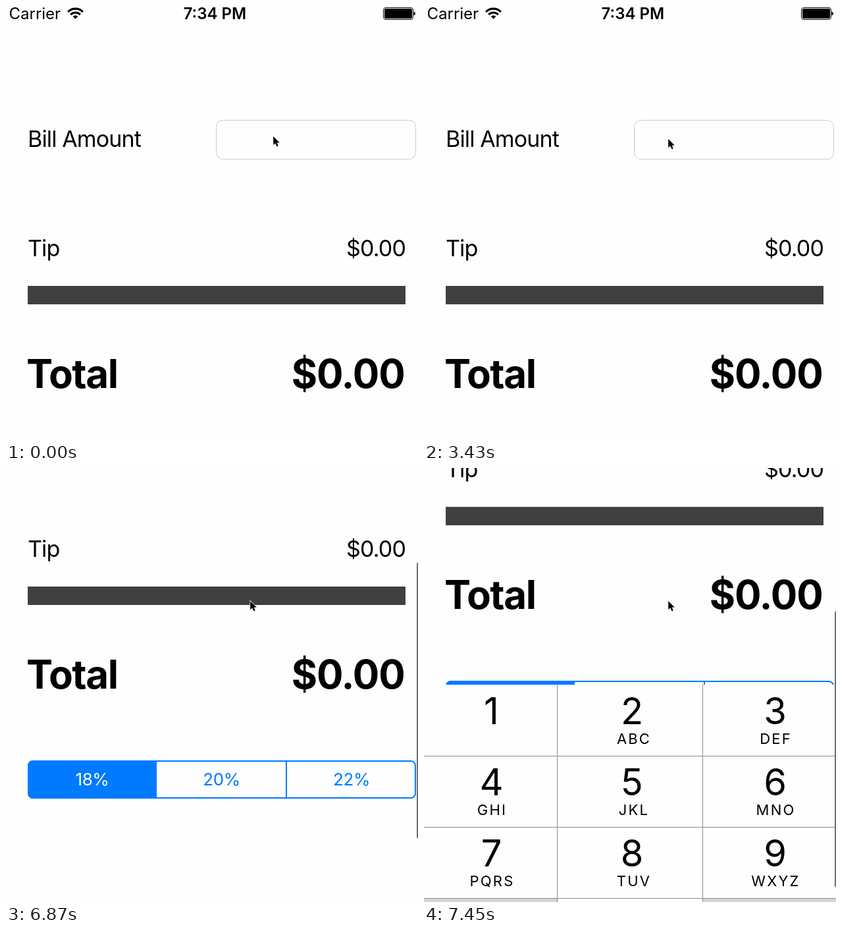
Animation, 626 px wide and 659 px high, one loop 8000 ms. Source, as an HTML page:

```html
<!DOCTYPE html>
<html lang="en">
<head>
<meta charset="utf-8">
<title>Tip calculator</title>
<style>
  html, body { margin: 0; width: 100%; height: 100%; overflow: hidden; background: #fefefe; }
  svg { display: block; width: 626px; height: 659px; font-family: Inter, sans-serif; }
  .label { font-size: 34px; letter-spacing: -.85px; }
  .total { font-size: 60px; font-weight: 700; letter-spacing: -1.4px; }
  .total.end { letter-spacing: -1.1px; }
  .status { font-size: 24px; }
  .seg { font-size: 26px; letter-spacing: -.4px; text-anchor: middle; fill: #007aff; }
  .digit { font-size: 56px; text-anchor: middle; }
  .letters { font-size: 22px; letter-spacing: 2.2px; text-anchor: middle; }
  .end { text-anchor: end; }
</style>
</head>
<body>
<svg viewBox="0 0 626 659">
  <rect width="626" height="659" fill="#fefefe"/>
  <g id="page">
    <text class="status" x="4.5" y="20">Carrier</text>
    <g fill="none" stroke="#000" stroke-width="3.2">
      <path d="M94.2 8.8a16 16 0 0 1 22.6 0"/>
      <path d="M98.2 13a10.4 10.4 0 0 1 14.6 0"/>
    </g>
    <path d="M105.5 19.8l-3.9-4a5.6 5.6 0 0 1 7.8 0z"/>
    <text class="status" x="317.3" y="20" font-weight="600" text-anchor="middle">7:34 PM</text>
    <rect x="573.5" y="2.5" width="45" height="18" rx="3.5" fill="none" stroke="#000"/>
    <rect x="575" y="4" width="42" height="15" rx="2"/>
    <path d="M619.5 8.5q2.5 .6 2.5 3t-2.5 3z"/>

    <text class="label" x="33" y="214">Bill Amount</text>
    <rect x="319.5" y="173.5" width="303" height="59" rx="10" fill="#fefefe" stroke="#ccc"/>
    <rect id="caret" x="605" y="183" width="4" height="36" rx="1" fill="#426bf2"/>

    <text class="label" x="33" y="380">Tip</text>
    <text class="label end" x="607" y="380">$0.00</text>
    <rect x="33" y="425" width="574" height="28" fill="#404040"/>
    <text class="total" x="31" y="580">Total</text>
    <text class="total end" x="605.5" y="580">$0.00</text>

    <rect x="34" y="690" width="588" height="56" rx="7" fill="none" stroke="#007aff" stroke-width="2"/>
    <path d="M229 689H41a8 8 0 0 0-8 8v42a8 8 0 0 0 8 8h188z" fill="#007aff"/>
    <path d="M426 690v56" stroke="#007aff" stroke-width="2"/>
    <text class="seg" x="131" y="727" style="fill:#fff">18%</text>
    <text class="seg" x="327.5" y="727">20%</text>
    <text class="seg" x="525" y="727">22%</text>
  </g>
  <g id="keys"></g>
  <rect id="bar" x="624" width="6" height="420" rx="3" fill="#707070"/>
  <g id="pointer">
    <path d="M1.2 0v13l3-2.7 2.2 5 2.3-1-2.1-4.8h4.1z" transform="translate(.5 1.2)" fill="#000" opacity=".22"/>
    <path d="M1.2 0v13l3-2.7 2.2 5 2.3-1-2.1-4.8h4.1z" stroke="#fff" stroke-width="1.4" paint-order="stroke"/>
  </g>
</svg>
<script>
const LOOP = 8000;
const TICK = 149; // the screen refreshes in ticks of this many ms
const $ = id => document.getElementById(id);

const part = (n, from, to) => Math.min(1, Math.max(0, (n - from) / (to - from)));
const easeIn = (p, power) => p ** power;
const easeOut = (p, power) => 1 - (1 - p) ** power;
const move = (el, x, y) => el.setAttribute("transform", `translate(${x} ${y})`);
const show = (el, on) => el.setAttribute("visibility", on ? "visible" : "hidden");

function buildKeys() {
  const letters = ["", "ABC", "DEF", "GHI", "JKL", "MNO", "PQRS", "TUV", "WXYZ"];
  const row = 108;
  let out = `<rect width="626" height="432" fill="#fefefe"/>
    <path d="M0 325h203v107H0zM424 325h202v107H424z" fill="#d1d5db"/>`;
  letters.forEach((word, i) => {
    const x = 102.5 + i % 3 * 215.5, y = Math.floor(i / 3) * row;
    out += `<text class="digit" x="${x - i % 3 * 2 % 4}" y="${y + 60}">${i + 1}</text>
      <text class="letters" x="${x + 1}" y="${y + 90}">${word}</text>`;
  });
  for (let i = 1; i < 4; i++) out += `<path d="M0 ${i * row + .5}H626" stroke="#8c8c8c"/>`;
  out += `<path d="M202.5 0V432M423.5 0V432" stroke="#8c8c8c"/>`;
  $("keys").innerHTML = out;
}

// Two strokes of the mouse: down to the left, then back to the right.
function pointerAt(n) {
  const a = easeOut(part(n, 4, 9), 1.7);
  const b = easeOut(part(n, 18, 23), 3);
  return [405 - 58 * a + 23 * b, 198 + 20 * a - 16 * b].map(Math.round);
}

// A nudge, a flick, then the push that follows the keyboard.
function scrollAt(n) {
  return Math.round(
    112 * easeOut(part(n, 39, 41), 2.3) +
    170 * easeOut(part(n, 45, 48), 3.76) +
    84 * easeIn(part(n, 48, 50), 1.43));
}

function draw(t) {
  const n = Math.floor((t + 4) / TICK);
  const scroll = scrollAt(n);
  move($("page"), 0, -scroll);
  move($("keys"), 0, Math.round(499 - 170 * part(n, 47, 50)));
  show($("keys"), n >= 47);
  show($("caret"), n >= 45);
  show($("bar"), scroll > 0);
  $("bar").setAttribute("y", Math.round(48 + (scroll - 89) * .61));
  move($("pointer"), ...pointerAt(n));
}

function tick() {
  draw(performance.now() % LOOP);
  requestAnimationFrame(tick);
}

buildKeys();
tick();
</script>
</body>
</html>
```
